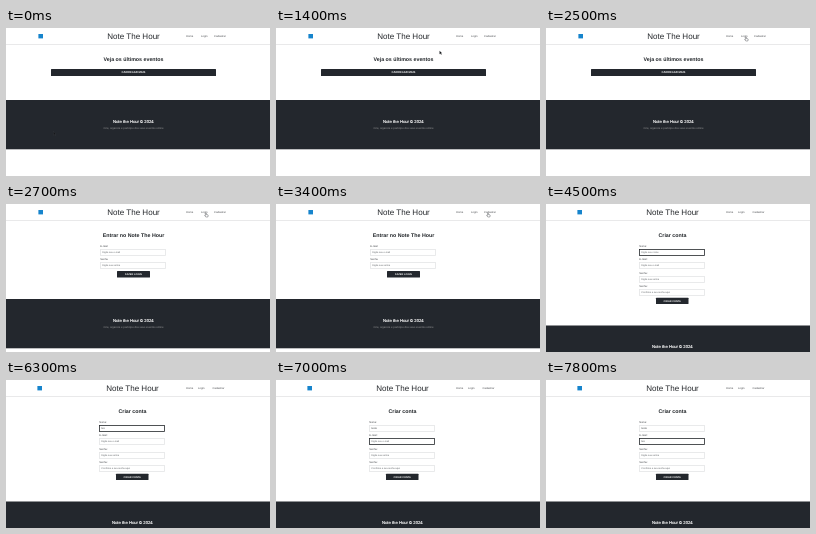
An HTML page that plays this animation: 264x148 px, repeating every 8000 ms.

```html
<!DOCTYPE html>
<html lang="pt-BR">
<head>
<meta charset="utf-8">
<title>Note The Hour</title>
<style>
html, body { margin: 0; width: 100%; height: 100%; overflow: hidden; background: #fff; }
svg { display: block; width: 100%; height: 100%; }
text { font-family: "Liberation Sans", Arial, sans-serif; text-rendering: geometricPrecision; }
</style>
</head>
<body>
<svg id="stage" viewBox="0 0 264 148" xmlns="http://www.w3.org/2000/svg"></svg>
<script>
const LOOP = 8000, STEP = 100;
const DARK = '#23272d', LINE = '#dadbdd', BORDER = '#e4e5e6', HINT = '#5c6064';
const stage = document.getElementById('stage');

function add(parent, tag, attrs, content) {
  const node = document.createElementNS(stage.namespaceURI, tag);
  for (const key in attrs) node.setAttribute(key, attrs[key]);
  if (content) node.textContent = content;
  parent.appendChild(node);
  return node;
}
const rect = (p, x, y, width, height, fill, more) =>
  add(p, 'rect', { x, y, width, height, fill, ...more });
const label = (p, x, y, size, fill, content, more) =>
  add(p, 'text', { x, y, 'font-size': size, fill, ...more }, content);
const centred = (p, x, y, size, fill, content, more) =>
  label(p, x, y, size, fill, content, { 'text-anchor': 'middle', ...more });

function makePage(shift, navX, heading, footerY) {
  const page = add(stage, 'g', {});
  const mid = 127.5 - shift;
  rect(page, 32.4 - shift, 6, 4.6, 4.4, '#1684cc');
  centred(page, mid, 11.1, 8.05, '#25282c', 'Note The Hour');
  ['Home', 'Login', 'Cadastrar'].forEach((name, i) =>
    label(page, navX[i], 9, 2.7, '#44474b', name));
  rect(page, 0, 16, 264, 0.6, LINE);
  centred(page, mid, 33, 5.3, '#212529', heading, { 'font-weight': 700 });
  rect(page, 0, footerY, 264, 49.3, DARK);
  centred(page, mid - 0.2, footerY + 22.9, 4.2, '#fff', 'Note the Hour © 2024',
    { stroke: '#fff', 'stroke-width': 0.15 });
  centred(page, mid, footerY + 28.9, 2.72, '#999a9b',
    'Crie, organize e participe dos seus eventos online');
  return page;
}

function makeButton(page, x, y, w, h, name, size) {
  rect(page, x, y, w, h, DARK, { rx: 0.5 });
  centred(page, x + w / 2, y + h / 2 + 0.9, size, '#fff', name, { 'font-weight': 700 });
}

function makeField(page, x, y, name, hint) {
  label(page, x + 0.3, y - 1.8, 2.6, '#3a3d41', name);
  const box = rect(page, x + 0.5, y + 0.5, 65, 6, '#fff',
    { stroke: BORDER, 'stroke-width': 0.8 });
  return { box, hint, value: label(page, x + 2.3, y + 4.3, 2.4, HINT, hint) };
}

const home = makePage(0, [180, 195, 208], 'Veja os últimos eventos', 72);
makeButton(home, 45, 41, 165, 7, 'CARREGAR MAIS', 2.8);

const login = makePage(0, [180, 195, 208], 'Entrar no Note The Hour', 95);
makeField(login, 94, 45, 'E-mail', 'Digite seu e-mail');
makeField(login, 94, 58, 'Senha', 'Digite sua senha');
makeButton(login, 111, 67, 33, 6.4, 'FAZER LOGIN', 2.5);

const signup = makePage(1, [180, 192, 206.6], 'Criar conta', 121.5);
const fields = [
  ['Nome:', 'Digite seu nome'],
  ['E-mail:', 'Digite seu e-mail'],
  ['Senha:', 'Digite sua senha'],
  ['Senha:', 'Confirme a sua senha aqui']
].map(([name, hint], i) => makeField(signup, 93, Math.round(45 + i * 13.35), name, hint));
makeButton(signup, 110, 93.7, 32.5, 6.2, 'CRIAR CONTA', 2.5);

const cursor = add(stage, 'g', {});
const arrow = add(cursor, 'path', {
  d: 'M0 0V3.6L.9 2.9 1.5 4.2 2.1 3.9 1.5 2.7 2.6 2.6Z',
  fill: '#15171a', stroke: '#fff', 'stroke-opacity': 0.25, 'stroke-width': 0.2
});
const hand = add(cursor, 'path', {
  d: 'M-.4 .2Q0-.3 .4 .2V1.5L2 1.9Q2.3 2.1 2.2 2.6L1.8 4H-.2L-1.4 2.3Q-1.2 1.7-.4 2.3Z',
  fill: '#fff', stroke: '#33363a', 'stroke-width': 0.4
});

// Each move: start time, end time, from point, to point
const moves = [
  [700, 1600, [47.5, 103.5], [180.3, 11]],
  [1600, 1700, [180.3, 11], [182.5, 9]],
  [1900, 2500, [182.5, 9], [200, 9]],
  [2700, 3400, [200, 9], [212, 9]],
  [3700, 4400, [212, 9], [110, 47]]
];
const ease = u => u * u * (3 - 2 * u);

function cursorAt(t) {
  let point = moves[0][2];
  for (const [start, end, from, to] of moves) {
    if (t < start) break;
    const k = ease(Math.min(1, (t - start) / (end - start)));
    point = from.map((v, i) => v + (to[i] - v) * k);
  }
  return point;
}

const typing = [[5600, 5700, 6300, 6600, 6700], [7500, 7600, 7800]];
const show = (node, on) => node.setAttribute('display', on ? 'inline' : 'none');

function draw(time) {
  const t = Math.floor((time % LOOP) / STEP) * STEP;
  show(home, t < 2700);
  show(login, t >= 2700 && t < 3700);
  show(signup, t >= 3700);

  const focus = t < 4500 ? -1 : t < 7000 ? 0 : 1;
  fields.forEach(({ box, hint, value }, i) => {
    const count = (typing[i] || []).filter(at => t >= at).length;
    value.textContent = count ? 'teste'.slice(0, count) : hint;
    value.setAttribute('font-size', count ? 2.6 : 2.4);
    value.setAttribute('fill', count ? '#3a3d41' : HINT);
    box.setAttribute('stroke', i === focus ? '#25282c' : BORDER);
  });

  const [x, y] = cursorAt(t);
  const onLink = t >= 1700 && t < 3800;
  cursor.setAttribute('transform', `translate(${x} ${y})`);
  show(cursor, t < 4500);
  show(arrow, !onLink);
  show(hand, onLink);
}

function tick() {
  draw(performance.now());
  requestAnimationFrame(tick);
}
tick();
</script>
</body>
</html>
```
